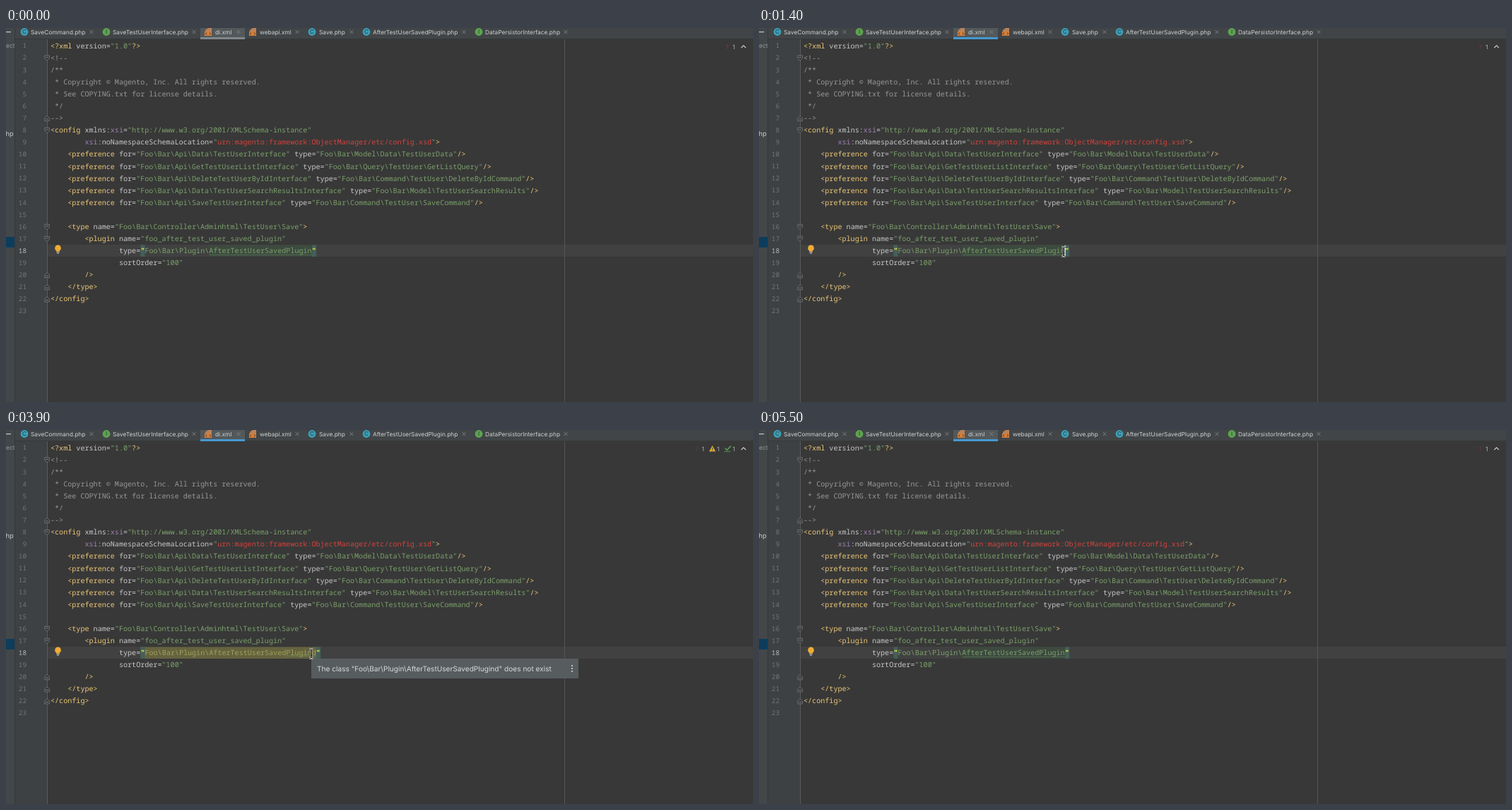
Recreate the animation shown at these times as an HTML page. Size 1057 by 530 pixels, loop 5600 ms.

```html
<!DOCTYPE html>
<html lang="en">
<head>
<meta charset="utf-8">
<title>Editor inspection</title>
<style>
html, body { margin: 0; width: 100%; height: 100%; overflow: hidden; background: #383838; }
svg { display: block; width: 1057px; height: 530px; }
text { white-space: pre; text-rendering: geometricPrecision; }
.code { font: 10.11px "Noto Sans Mono", "DejaVu Sans Mono", monospace; }
.num { font: 9.3px "Noto Sans Mono", "DejaVu Sans Mono", monospace; text-anchor: end; }
.ui { font-family: Inter, Roboto, sans-serif; }
.tag { fill: #ecc677; font-weight: 500; }
.attr { fill: #c8c8c8; }
.str { fill: #7ba06b; }
.ns { fill: #a080b4; }
.bad { fill: #d3433e; }
.note { fill: #979797; }
.quote { fill: #f4e63c; font-weight: 600; }
.warn { fill: #9da15a; }
</style>
</head>
<body>
<svg id="stage" viewBox="0 0 1057 530"></svg>
<script>
const LOOP = 5600, STEP = 100, CW = 6.066, LEFT = 63, PITCH = 17.09;
const stage = document.getElementById('stage');
const colX = c => LEFT + c * CW;
const rowY = n => 25 + (n - 1) * PITCH;

function add(tag, attrs, parent = stage, content) {
  const el = document.createElementNS('http://www.w3.org/2000/svg', tag);
  for (const k in attrs) el.setAttribute(k, attrs[k]);
  if (content !== undefined) el.textContent = content;
  parent.appendChild(el);
  return el;
}
const group = (parent = stage) => add('g', {}, parent);
const rect = (x, y, width, height, fill, parent) => add('rect', { x, y, width, height, fill }, parent);
const path = (d, stroke, w = 1, parent, fill = 'none') =>
  add('path', { d, stroke, 'stroke-width': w, fill }, parent);
const label = (x, y, s, size, fill, parent) =>
  add('text', { x, y, 'font-size': size, fill, class: 'ui' }, parent, s);

function code(col, row, parts, parent) {
  const t = add('text', { x: colX(col), y: rowY(row) + 3.6, class: 'code' }, parent);
  for (const [s, cls] of parts) add('tspan', { class: cls }, t, s);
}

// panels and gutter
rect(0, 0, 1057, 530, '#383838');
rect(13, 0, 45, 530, '#3d4143');
rect(59, 307, 998, 17, '#414141');
rect(58, 16, 1, 514, '#595b5c');
rect(790, 16, 1, 514, '#555555');
rect(0, 0, 13, 530, '#43474a');
rect(0, 296, 12, 15, '#0d3d5c');
rect(12, 0, 1, 530, '#36393b');
rect(0, 5, 7, 1.2, '#c8c8c8');
label(0, 28, 'ect', 8.5, '#92979a');
label(-0.5, 152.5, 'hp', 9.3, '#c9cccd');

// tabs: kind, icon x, text x, close x, title
rect(13, 0, 1044, 15, '#414547');
rect(13, 15, 1044, 1, '#363839');
rect(275, 0, 63, 16, '#53585b');
const underline = rect(275, 13, 63, 3, '#80878b');
const tabs = [
  ['C', 26, 35, 121, 'SaveCommand.php'],
  ['I', 142, 151, 266, 'SaveTestUserInterface.php'],
  ['x', 287, 296, 329, 'di.xml'],
  ['x', 350, 359, 412, 'webapi.xml'],
  ['C', 433, 443, 489, 'Save.php'],
  ['C', 510, 519, 648, 'AfterTestUserSavedPlugin.php'],
  ['I', 669, 678, 792, 'DataPersistorInterface.php']
];
for (const [kind, ix, tx, cx, title] of tabs) {
  if (kind === 'x') {
    path(`M${ix - 1} 0h5v11h-9v-8z`, 'none', 0, stage, '#bb8257');
    rect(ix - 6, 5, 10, 6, '#d5803c');
    path(`M${ix - 3} 6.3l-1.6 1.7 1.6 1.7M${ix + 1} 6.3l1.6 1.7-1.6 1.7`, '#4b3526');
  } else {
    add('circle', { cx: ix, cy: 5.5, r: 5.4, fill: kind === 'C' ? '#3ca0b9' : '#5da44f' });
    const t = label(ix, 8.4, kind, 8, '#26383c');
    t.setAttribute('text-anchor', 'middle');
  }
  label(tx, 8.8, title, 8.35, '#cdd0d1');
  path(`M${cx - 2.4} 3.2l4.8 4.8m0-4.8l-4.8 4.8`, '#80868a', 0.9);
}

// line numbers and fold marks
for (let n = 1; n <= 23; n++)
  add('text', { x: 29, y: rowY(n) + 3.4, class: 'num', fill: n === 18 ? '#b9bcbd' : '#727679' }, stage, n);
const fold = (n, dir) => {
  const y = rowY(n) + 0.5;
  path(`M54.8 ${y - 3.6 * dir}h6.6v${4 * dir}l-3.3 ${3.2 * dir}l-3.3 ${-3.2 * dir}z`, '#75787a', 0.9, stage, '#383838');
  path(`M56.4 ${y - dir}h3.4`, '#8a8d8f', 0.9);
};
[2, 8, 16, 17].forEach(n => fold(n, 1));
[7, 20, 21, 22].forEach(n => fold(n, -1));

// static code
const pref = (api, impl) => `    <preference for="Foo\\Bar\\Api\\${api}" type="Foo\\Bar\\${impl}"/>`;
const lines = [
  '<?xml version="1.0"?>',
  '<!--',
  '/**',
  ' * Copyright © Magento, Inc. All rights reserved.',
  ' * See COPYING.txt for license details.',
  ' */',
  '-->',
  '<config xmlns:xsi="http://www.w3.org/2001/XMLSchema-instance"',
  '        xsi:noNamespaceSchemaLocation="urn:magento:framework:ObjectManager/etc/config.xsd">',
  pref('Data\\TestUserInterface', 'Model\\Data\\TestUserData'),
  pref('GetTestUserListInterface', 'Query\\TestUser\\GetListQuery'),
  pref('DeleteTestUserByIdInterface', 'Command\\TestUser\\DeleteByIdCommand'),
  pref('Data\\TestUserSearchResultsInterface', 'Model\\TestUserSearchResults'),
  pref('SaveTestUserInterface', 'Command\\TestUser\\SaveCommand'),
  '',
  '    <type name="Foo\\Bar\\Controller\\Adminhtml\\TestUser\\Save">',
  '        <plugin name="foo_after_test_user_saved_plugin"',
  '                type=',
  '                sortOrder="100"',
  '        />',
  '    </type>',
  '</config>'
];
function tokens(s) {
  const re = /(<[\/?]?\w+|[\/?]?>)|("[^"]*")|(xsi)(?=[:=])|\s+|\w+|./g;
  const out = [];
  for (const m of s.matchAll(re)) {
    if (m[2] && m[2].startsWith('"urn')) out.push(['"', 'str'], [m[2].slice(1, -1), 'bad'], ['"', 'str']);
    else out.push([m[0], m[1] ? 'tag' : m[2] ? 'str' : m[3] ? 'ns' : 'attr']);
  }
  return out;
}
lines.forEach((s, i) => code(0, i + 1, i > 0 && i < 7 ? [[s, 'note']] : tokens(s)));

// the edited string on row 18
const NS = 'Foo\\Bar\\Plugin\\', CLS = 'AfterTestUserSavedPlugin';
const [Q, N, C, E] = [21, 22, 37, 61];
const WARN = '#65633f', MATCH = '#43605a', USAGE = '#3d4a3f';
const band = (from, to, fill, g) => rect(colX(from), 307.5, (to - from) * CW, 16.5, fill, g);
function wave(from, to, g) {
  let d = `M${colX(from)} 321`;
  for (let x = colX(from), i = 0; x < colX(to) - 1; x += 1.5, i++) d += `l1.5 ${i % 2 ? 1.5 : -1.5}`;
  path(d, '#66945f', 0.8, g);
}
function stringView(build) {
  const g = group();
  build(g);
  return g;
}
const views = {
  valid: stringView(g => {
    band(Q, N, MATCH, g);
    band(C, E, USAGE, g);
    band(E, E + 1, MATCH, g);
    path(`M${colX(C)} 321.5H${colX(E)}`, '#577153', 0.8, g);
    code(Q, 18, [['"', 'quote'], [NS + CLS, 'str'], ['"', 'quote']], g);
  }),
  typed: stringView(g => {
    band(Q, E + 2, WARN, g);
    band(Q, N, MATCH, g);
    band(E + 1, E + 2, MATCH, g);
    wave(E - 6, E + 1, g);
    code(Q, 18, [['"', 'quote'], [NS + CLS + 'd', 'warn'], ['"', 'quote']], g);
  }),
  fixed: stringView(g => {
    band(Q, C, WARN, g);
    band(Q, N, MATCH, g);
    band(C, E, USAGE, g);
    band(E, E + 1, MATCH, g);
    wave(E - 6, E, g);
    code(Q, 18, [['"', 'quote'], [NS, 'warn'], [CLS, 'str'], ['"', 'quote']], g);
  })
};
const caret = rect(0, 308, 1.4, 15.5, '#d8d8d8');

// light bulb
const bulb = group();
path('M73.5 307.5a4.4 4.4 0 0 1 2.4 8v1.2h-4.8v-1.2a4.4 4.4 0 0 1 2.4-8z', 'none', 0, bulb, '#efac35');
rect(71.4, 317.2, 4.2, 1.2, '#b3b7b9', bulb);
rect(72.2, 318.9, 2.6, 1, '#b3b7b9', bulb);

// inspection counters
const error = label(0, 29.5, '?', 8.5, '#a7322f');
const errorCount = label(0, 29.8, '1', 8.5, '#b7b9ba');
const extra = group();
path('M999.5 22l4.6 8.6h-9.2z', 'none', 0, extra, '#dca92f');
path('M999.5 25v2.6m0 1v1.1', '#453d2c', 1, extra);
label(1006, 29.8, '1', 8.5, '#b7b9ba', extra);
path('M1017.5 25.5l2.8 3 5.4-6', '#57a653', 1.5, extra);
path('M1016.5 31l1.6-1.2 1.8 1.2 1.8-1.2 1.8 1.2 1.8-1.2', '#57a653', 0.9, extra);
label(1028, 29.8, '1', 8.5, '#b7b9ba', extra);
path('M1040.4 28l3.2-3.2 3.2 3.2', '#c4c6c7', 1.3);

// tooltip
const tip = group();
rect(432, 324, 378, 28, '#575c5f', tip);
label(440, 342, 'The class "Foo\\Bar\\Plugin\\AfterTestUserSavedPlugind" does not exist', 10.12, '#d6d9da', tip);
[334, 338, 342].forEach(cy => add('circle', { cx: 801, cy, r: 1.1, fill: '#d6d9da' }, tip));

// pointers
const arrow = group();
path('M0 0v11.5l2.7-2.4 1.9 4.3 2-.9-1.9-4.2h3.6z', '#ececec', 1, arrow, '#151515');
const beam = group();
const beamShape = 'M-3-6.5q3 0 3 2v9q0 2-3 2M3-6.5q-3 0-3 2v9q0 2 3 2M-1.6 2h3.2';
path(beamShape, '#e8e8e8', 2.4, beam);
path(beamShape, '#181818', 1, beam);

// [time, x, y]
const track = [
  [400, 505, 530], [700, 461, 403], [800, 431, 317], [1700, 431, 317],
  [1800, 439, 327], [2000, 439, 327], [2200, 432, 317], [LOOP, 432, 317]
];
function mouseAt(t) {
  const i = Math.max(1, track.findIndex(k => k[0] >= t));
  const [a, ax, ay] = track[i - 1], [b, bx, by] = track[i];
  const u = Math.min(1, Math.max(0, (t - a) / (b - a)));
  return `translate(${ax + (bx - ax) * u} ${ay + (by - ay) * u})`;
}

const show = (el, on) => el.setAttribute('visibility', on ? 'visible' : 'hidden');
const within = (t, a, b) => t >= a && t < b;

function render(t) {
  const view = within(t, 1700, 4400) ? 'typed' : within(t, 4400, 4900) ? 'fixed' : 'valid';
  for (const k in views) show(views[k], k === view);

  const flagged = within(t, 1800, 4900);
  show(extra, flagged);
  show(error, !within(t, 4400, 4900));
  error.setAttribute('x', flagged ? 975 : 1018.5);
  error.setAttribute('opacity', flagged ? 0.5 : t < 700 ? 1 : 0.75);
  errorCount.setAttribute('x', flagged ? 984.5 : 1028);
  errorCount.setAttribute('opacity', within(t, 4400, 4900) ? 0.6 : 1);

  show(bulb, t < 1700 || within(t, 2500, 4400) || t >= 5200);
  show(tip, within(t, 2500, 4900));
  underline.setAttribute('fill', t < 1200 ? '#80878b' : '#4698cf');

  // the blink restarts with each click or key
  const since = t - (t >= 4400 ? 4400 : t >= 1700 ? 1700 : 1200);
  show(caret, since >= 0 && since % 1200 < 600);
  caret.setAttribute('x', colX(view === 'typed' ? E + 1 : E) - 0.5);

  const move = mouseAt(t);
  arrow.setAttribute('transform', move);
  beam.setAttribute('transform', move);
  show(arrow, within(t, 400, 1200));
  show(beam, within(t, 1200, 1700) || within(t, 1800, 4400));
}

const start = performance.now();
function tick() {
  const t = (performance.now() - start) % LOOP;
  render(Math.floor(t / STEP) * STEP);
  requestAnimationFrame(tick);
}
render(0);
requestAnimationFrame(tick);
</script>
</body>
</html>
```
